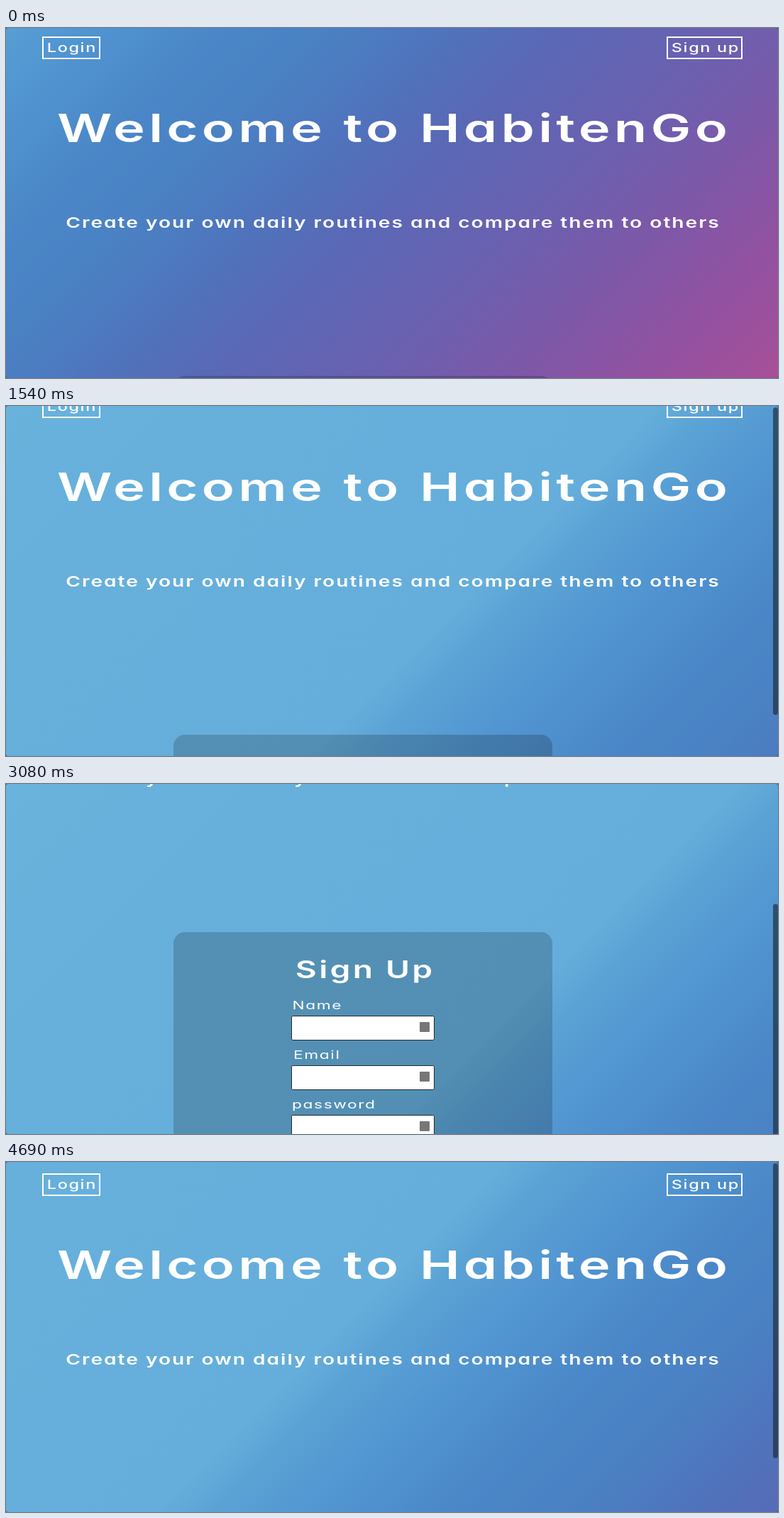
An HTML page for the animation above (4.76 s loop, 1088x494 px).

```html
<!DOCTYPE html>
<html lang="en">
<head>
<meta charset="utf-8">
<title>Welcome to HabitenGo</title>
<style>
  html, body { margin: 0; height: 100%; overflow: hidden; background: #345670; }
  svg { display: block; width: 100vw; height: 100vh; border-radius: 3px; }
  text { font-family: Inter, "Open Sans", sans-serif; }
  .wide { fill: #fff; text-anchor: middle; font-feature-settings: "cv11"; }
  .outline { fill: none; stroke: #fff; stroke-width: 2; }
  .field { fill: #fff; stroke: #1c2a33; }
</style>
</head>
<body>
<svg viewBox="0 0 1088 494">
  <defs>
    <linearGradient id="sky" gradientUnits="userSpaceOnUse"></linearGradient>
  </defs>
  <rect width="1088" height="494" fill="url(#sky)"/>
  <g id="page">
    <rect class="outline" x="52" y="13" width="80" height="30"/>
    <rect class="outline" x="932" y="13" width="105" height="30"/>
    <rect x="236" y="491" width="534" height="620" rx="16" fill="#000" fill-opacity=".18"/>
    <rect x="402" y="804" width="83" height="43" rx="2" fill="#fff"/>
    <text x="412" y="832" font-size="17" fill="#333">Sign up</text>
  </g>
  <rect id="thumb" x="1081" width="7" rx="3.5" fill="rgba(25,40,50,.64)"/>
</svg>
<script>
const LOOP = 4760, STEP = 70, WIDEN = 1.38, TRACK = .07;
const $ = id => document.getElementById(id);
const page = $('page'), sky = $('sky'), thumb = $('thumb');

function add(parent, tag, attrs, content = '') {
  const el = document.createElementNS('http://www.w3.org/2000/svg', tag);
  for (const k in attrs) el.setAttribute(k, attrs[k]);
  el.textContent = content;
  parent.append(el);
}

// Extended sans: every heading and label shares one width and tracking.
function label(str, x, y, size, weight) {
  const gap = size * TRACK;
  add(page, 'text', {
    class: 'wide', 'font-size': size, 'font-weight': weight, 'letter-spacing': gap,
    transform: `translate(${x + gap * WIDEN / 2} ${y}) scale(${WIDEN} 1)`
  }, str);
}

label('Login', 92, 34, 17, 500);
label('Sign up', 985, 34, 17, 500);
label('Welcome to HabitenGo', 544.5, 161, 55, 560);
label('Create your own daily routines and compare them to others', 544.5, 281.5, 20.4, 560);
label('Sign Up', 504.5, 556, 33.5, 560);
[['Name', 438], ['Email', 437.5], ['password', 461.5]].forEach(([name, x], i) => {
  const y = 600 + 70 * i;
  label(name, x, y, 16.5, 400);
  add(page, 'rect', { class: 'field', x: 402.5, y: y + 9.5, width: 201, height: 34, rx: 2 });
  add(page, 'rect', { x: 583, y: y + 18, width: 14, height: 14, rx: 1, fill: '#777' });
});

// Stops are placed by x + y, the distance along the diagonal.
const FROM = -800, TO = 2400;
for (const [at, color] of [
  [-800, '104,187,216'], [-600, '104,184,218'], [-420, '106,180,220'], [0, '103,176,220'],
  [690, '101,174,219'], [770, '91,163,213'], [928, '81,149,209'], [1130, '74,134,199'],
  [1260, '74,130,196'], [1420, '78,117,189'], [1600, '90,104,182'], [1816, '105,97,176'],
  [2016, '125,88,168'], [2216, '147,81,160'], [2400, '168,80,152']
]) add(sky, 'stop', { offset: (at - FROM) / (TO - FROM), 'stop-color': `rgb(${color})` });
for (const [k, v] of [['x1', FROM], ['y1', FROM], ['x2', TO], ['y2', TO]]) sky.setAttribute(k, v / 2);

const drift = curve([[0, 816], [1190, 0], [1540, -254], [2100, -735], [2450, -775],
  [3080, -622], [3850, -389], [4690, -8], [4760, 24]]);
const scroll = curve([[0, 0], [1260, 0], [1540, 27], [1680, 52], [2100, 139], [3080, 282],
  [3360, 308], [3780, 356], [3850, 357], [3990, 357], [4450, -2], [4690, -4], [4760, -4]]);

// Smooth curve through [time, value] keys that never overshoots them.
function curve(keys) {
  const slope = keys.slice(1).map(([t, v], i) => (v - keys[i][1]) / (t - keys[i][0]));
  const tangent = keys.map((_, i) => {
    const a = slope[i - 1] ?? slope[i], b = slope[i] ?? a;
    return a * b > 0 ? 2 * a * b / (a + b) : 0;
  });
  return t => {
    let i = 0;
    while (i < keys.length - 2 && t >= keys[i + 1][0]) i++;
    const [t0, v0] = keys[i], [t1, v1] = keys[i + 1];
    const d = t1 - t0, u = (t - t0) / d, w = 1 - u;
    return v0 * (1 + 2 * u) * w * w + v1 * u * u * (3 - 2 * u)
      + d * u * w * (tangent[i] * w - tangent[i + 1] * u);
  };
}

function draw() {
  const t = Math.floor(performance.now() % LOOP / STEP) * STEP;
  const y = Math.round(scroll(t));
  const shift = -(drift(t) + y) / 2;
  sky.setAttribute('gradientTransform', `translate(${shift} ${shift})`);
  page.setAttribute('transform', `translate(0 ${-y})`);

  // The thumb shrinks while the page is pulled past its top.
  const past = y - 27;
  thumb.setAttribute('y', 2 + .656 * Math.max(0, past));
  thumb.setAttribute('height', 434 + .58 * Math.min(0, past));
  thumb.setAttribute('visibility', t > 1260 ? 'visible' : 'hidden');
  requestAnimationFrame(draw);
}
draw();
</script>
</body>
</html>
```
